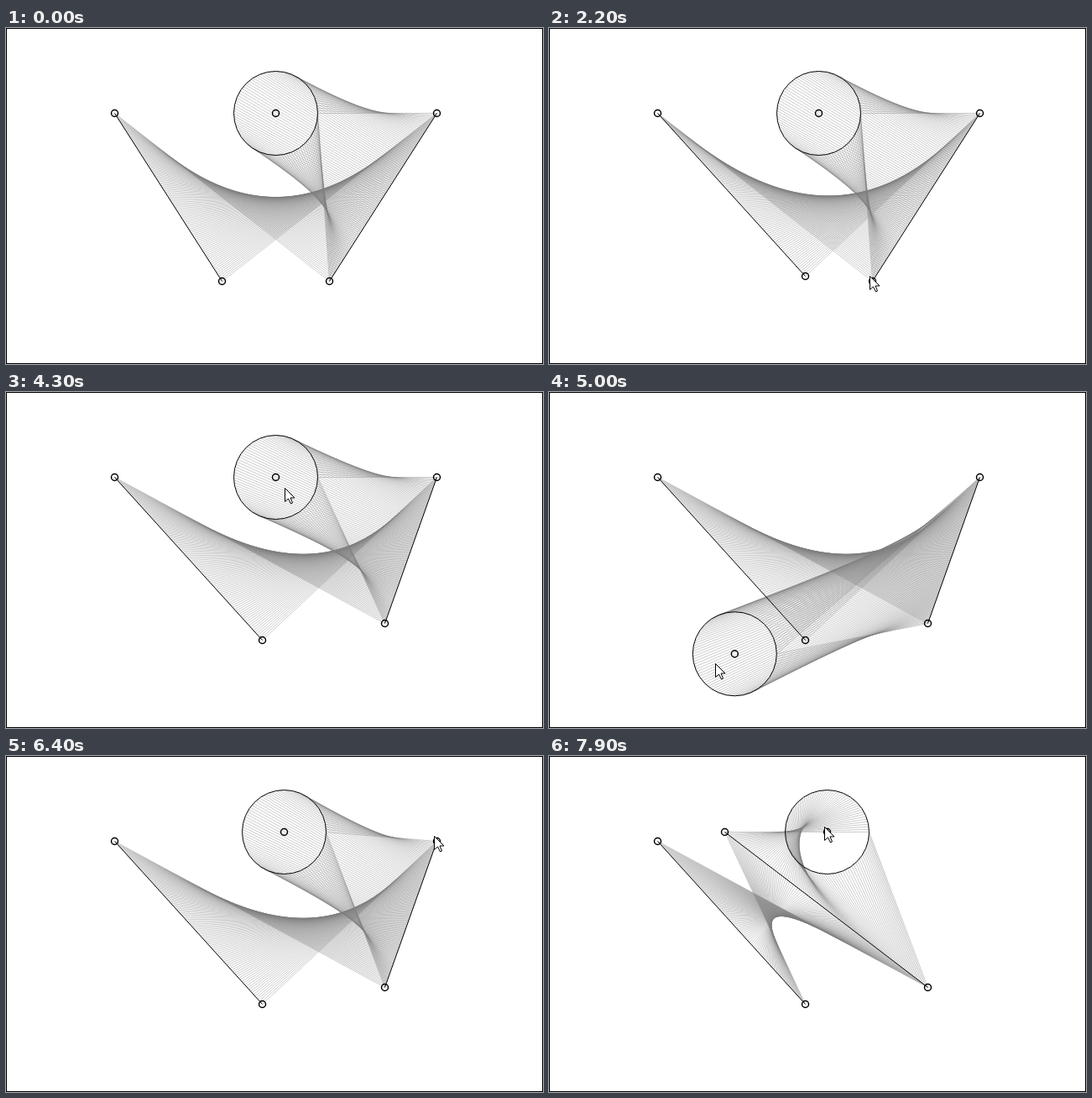
An HTML page with a canvas for the animation above (8000 ms loop, 640 px wide and 400 px high).

```html
<!DOCTYPE html>
<html lang="en">
<head>
<meta charset="utf-8">
<title>String art</title>
<style>
  html, body { margin: 0; width: 640px; height: 400px; overflow: hidden; background: #fff; }
  canvas { display: block; }
</style>
</head>
<body>
<canvas id="stage" width="640" height="400"></canvas>
<script>
const ctx = document.getElementById('stage').getContext('2d');
const LOOP = 8000, STEP = 100, STRINGS = 100, RADIUS = 50;
const LEAD = 100;  // ms by which the pointer runs ahead of a dragged handle
const PAUSE = 100; // ms the pointer rests on a handle before dragging it

const rest = { a: [129, 101], b: [257, 301], c: [385, 301], d: [513, 101], o: [321, 101] };
const entry = { time: 200, at: [318, 388] };

// Each drag passes through its points at equal intervals.
const drags = [
  { name: 'b', from: 1000, to: 1800, via: [[275, 305], [305, 295]] },
  { name: 'c', from: 2300, to: 3900, via: [[430, 300], [284, 219], [330, 345], [451, 275]] },
  { name: 'o', from: 4500, to: 6150, via: [[210, 320], [91, 220], [331, 90]] },
  { name: 'd', from: 6500, to: 7400, via: [[340, 180], [209, 90]] },
  { name: 'o', from: LOOP }
];

const clamp = u => Math.max(0, Math.min(1, u));
const ease = u => u * u * (3 - 2 * u);
const mix = (p, q, u) => [p[0] + (q[0] - p[0]) * u, p[1] + (q[1] - p[1]) * u];

// Catmull-Rom curve through evenly timed points
function along(points, u) {
  const last = points.length - 1, s = clamp(u) * last;
  const i = Math.min(Math.floor(s), last - 1), f = s - i;
  const [p, q, r, e] = [-1, 0, 1, 2].map(k => points[Math.max(0, Math.min(last, i + k))]);
  return [0, 1].map(k => q[k] + f / 2 * (r[k] - p[k] +
    f * (2 * p[k] - 5 * q[k] + 4 * r[k] - e[k] + f * (3 * (q[k] - r[k]) + e[k] - p[k]))));
}

// Handle positions and pointer position at time t
function pose(t) {
  const handles = { ...rest };
  let { time, at } = entry, pointer = null;
  for (const { name, from, to, via } of drags) {
    const start = handles[name];
    if (t < from) {
      const goal = [start[0] - 3, start[1] - 6];
      if (t >= time) pointer = mix(at, goal, ease(clamp((t - time) / (from - PAUSE - time))));
      break;
    }
    const points = [start, ...via], curve = ms => along(points, (ms - from) / (to - from));
    handles[name] = curve(t);
    pointer = curve(t + LEAD);
    if (t < to) break;
    time = to;
    at = pointer;
  }
  return { ...handles, pointer };
}

function line(p, q) {
  ctx.beginPath();
  ctx.moveTo(...p);
  ctx.lineTo(...q);
  ctx.stroke();
}

function ring(p, r) {
  ctx.beginPath();
  ctx.arc(...p, r, 0, 2 * Math.PI);
  ctx.stroke();
}

const arrowShape = new Path2D('M0 0V16L4 12.5L7 18.5L9 17.5L6.5 11.5H11.5Z');

function arrow([x, y]) {
  ctx.save();
  ctx.translate(Math.round(x), Math.round(y));
  ctx.fill(arrowShape);
  ctx.stroke(arrowShape);
  ctx.restore();
}

function draw(t) {
  const { a, b, c, d, o, pointer } = pose(t);
  ctx.setTransform(1, 0, 0, 1, 0.5, 0.5);
  ctx.fillStyle = '#fff';
  ctx.fillRect(-1, -1, 642, 402);

  ctx.lineWidth = 1;
  ctx.strokeStyle = 'rgba(128, 128, 128, 0.4)';
  for (let i = 0; i <= STRINGS; i++) {
    const u = i / STRINGS, angle = 2 * Math.PI * u, end = mix(c, d, u);
    line(mix(a, b, u), end);
    line([o[0] + RADIUS * Math.cos(angle), o[1] + RADIUS * Math.sin(angle)], end);
  }

  ctx.strokeStyle = '#000';
  line(a, b);
  line(c, d);
  ring(o, RADIUS);
  ctx.lineWidth = 1.5;
  for (const p of [a, b, c, d, o]) ring(p, 4);
  ctx.lineWidth = 1;
  if (pointer) arrow(pointer);
  ctx.strokeRect(0, 0, 639, 399);
}

const begin = performance.now();
function tick() {
  const t = (performance.now() - begin) % LOOP;
  draw(Math.floor(t / STEP) * STEP);
  requestAnimationFrame(tick);
}
tick();
</script>
</body>
</html>
```
